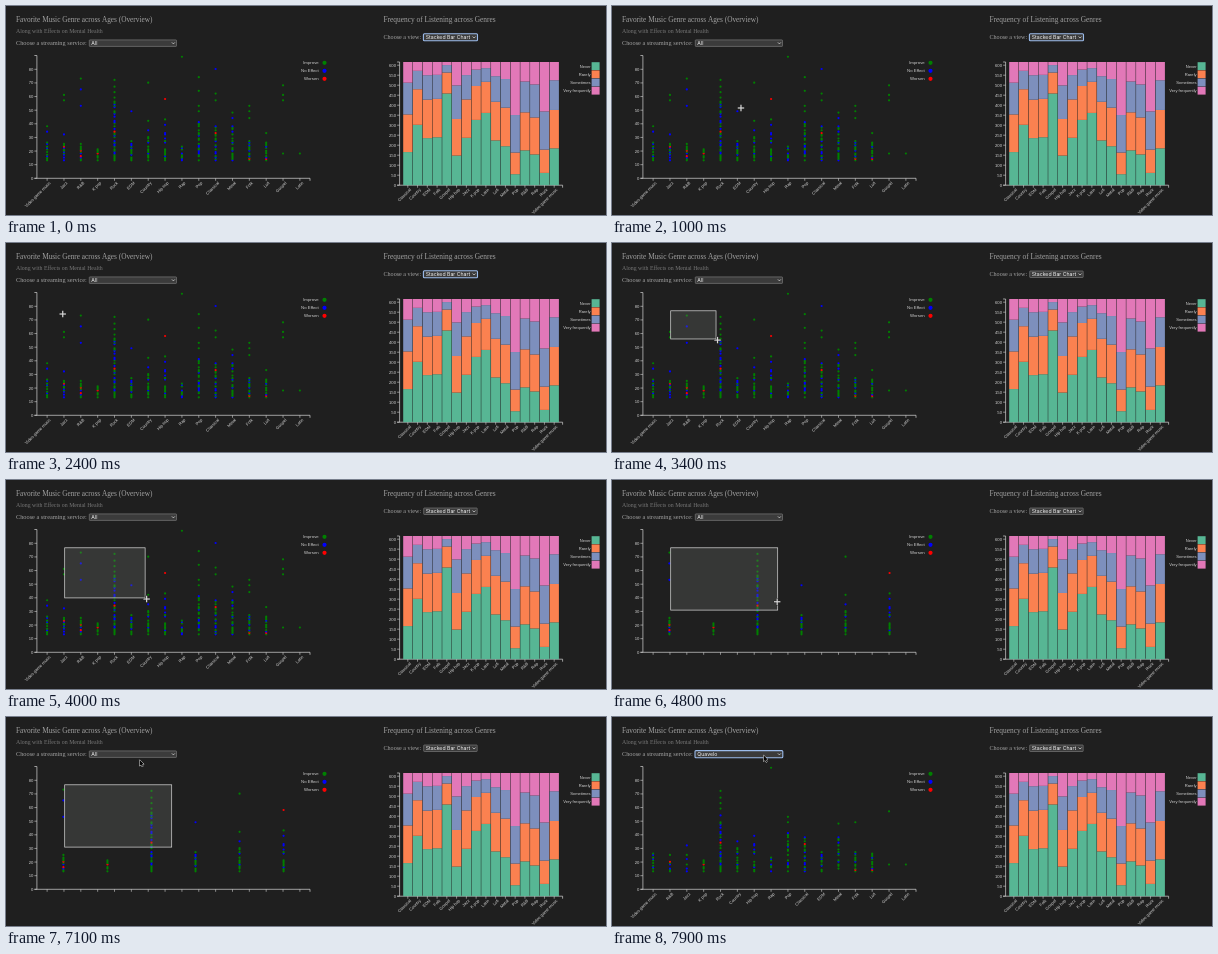
Write an HTML page with a canvas that moves like this. It is 600 px wide and 209 px high and loops after 8000 ms.

```html
<!DOCTYPE html>
<html lang="en">
<head>
<meta charset="utf-8">
<title>Music charts</title>
<style>
html, body { margin: 0; width: 100%; height: 100%; overflow: hidden; background: #1f1f1f; }
canvas { display: block; width: 600px; height: 209px; }
</style>
</head>
<body>
<canvas id="stage"></canvas>
<script>
const W = 600, H = 209, LOOP = 8000;
const canvas = document.getElementById('stage');
const ctx = canvas.getContext('2d');
const ratio = window.devicePixelRatio || 1;
canvas.width = W * ratio;
canvas.height = H * ratio;

const SERIF = '"Liberation Serif", serif';
const SANS = '"Liberation Sans", sans-serif';
const UI = 'Inter, sans-serif';
const AXIS = '#d4d4d4';
const GREEN = '#008000', BLUE = '#0000ff', RED = '#ff0000';
const BANDS = ['#57b694', '#fb8150', '#7d8fbd', '#e278b8'];

// name, log-odds of never listening, upper age of the crowd, lone ages on and off the service
const GENRES = [
  ['Video game music', -.85, 27, [], [38, 34]],
  ['Jazz', -.47, 25, [32], [61, 57]],
  ['R&B', -.93, 25, [], [73, 65, 53]],
  ['K pop', .12, 21, [], []],
  ['Rock', -2.2, 59, [72, 67, 63], []],
  ['EDM', -.48, 29, [], [49]],
  ['Country', -.04, 30, [35], [70, 42]],
  ['Hip hop', -1.15, 33, [39], [58, 43]],
  ['Rap', -1.1, 24, [89], []],
  ['Pop', -2.32, 41, [53, 49], [74, 64]],
  ['Classical', -1, 38, [], [80, 62, 57]],
  ['Metal', -.77, 39, [48], [44]],
  ['Folk', -.45, 29, [49], [53, 44]],
  ['Lofi', -.56, 26, [], [33]],
  ['Gospel', 1.07, 0, [57, 18], [68, 61]],
  ['Latin', .35, 0, [18], []]
];
const ALL = GENRES.map(g => g[0]);
const ZOOMED = ALL.slice(2, 8);
const FILTERED = ('Video game music,R&B,Jazz,K pop,Rock,Country,Hip hop,Rap,' +
  'Pop,Classical,EDM,Metal,Folk,Lofi,Gospel,Latin').split(',');
const SERVICES = ['All', 'Quavelo', 'ClipBarn Music', 'I do not use a streaming service.',
  'Quince Music', 'Other streaming service', 'Melvana'];

let seed = 11;
function random() {
  seed = (seed * 16807) % 2147483647;
  return seed / 2147483647;
}

const dots = [];
for (const [name, , crowd, on, off] of GENRES) {
  const add = (age, kept) => {
    const r = random();
    dots.push({ name, age, kept, color: r < .7 ? GREEN : r < .96 ? BLUE : RED });
  };
  for (let age = 13; age <= crowd; age++) {
    if (random() < .95 - .3 * age / crowd) add(age, random() < .8);
  }
  on.forEach(age => add(age, true));
  off.forEach(age => add(age, false));
}

function text(str, x, y, size, family, color, align = 'left') {
  ctx.font = size + 'px ' + family;
  ctx.fillStyle = color;
  ctx.textAlign = align;
  ctx.fillText(str, x, y);
}

function slanted(str, x, y) {
  ctx.save();
  ctx.translate(x, y);
  ctx.rotate(-Math.PI / 4);
  text(str, 0, 0, 4.2, SANS, AXIS, 'right');
  ctx.restore();
}

function path(points, color, width) {
  ctx.beginPath();
  points.forEach(([x, y]) => ctx.lineTo(x, y));
  ctx.strokeStyle = color;
  ctx.lineWidth = width;
  ctx.stroke();
}

function disc(x, y, r, color) {
  ctx.beginPath();
  ctx.arc(x, y, r, 0, 7);
  ctx.fillStyle = color;
  ctx.fill();
}

function box(x, y, w, h, r, fill, stroke, width) {
  ctx.beginPath();
  ctx.roundRect(x, y, w, h, r);
  ctx.fillStyle = fill;
  ctx.fill();
  if (!stroke) return;
  ctx.strokeStyle = stroke;
  ctx.lineWidth = width;
  ctx.stroke();
}

function select(label, x, y, w, focused) {
  if (focused) box(x - .3, y - .3, w + .6, 7.1, 1, '#3b3b3b', '#9cbcec', 1.1);
  else box(x, y, w, 6.5, .6, '#3b3b3b', '#858585', .6);
  text(label, x + 2, y + 5.1, 5.2, UI, '#f4f4f4');
  path([[x + w - 4.6, y + 2.5], [x + w - 3.1, y + 4], [x + w - 1.6, y + 2.5]], '#e8e8e8', .7);
}

// both axes of a chart, with values up the side
function axes(left, right, top, base, step, count, unit) {
  path([[left - 2.5, top], [left, top], [left, base], [left - 2.5, base]], AXIS, .7);
  path([[left, base], [right, base], [right, base + 2.5]], AXIS, .7);
  for (let i = 0; i <= count; i++) {
    const y = base - i * step * unit;
    path([[left - 2.5, y], [left, y]], AXIS, .6);
    text(i * step, left - 3.6, y + 1.5, 4.2, SANS, AXIS, 'right');
  }
}

// point scale over the scatter axis
function columns(names) {
  const step = 273 / (names.length + .2);
  return Object.fromEntries(names.map((n, i) => [n, 31 + step * (i + .6)]));
}

function scatter(names, filtered, labels) {
  const unit = 1.3625;
  axes(30.9, 304, 49.5, 172.3, 10, 8, unit);
  for (const [name, x] of Object.entries(columns(labels ? names : ALL))) {
    path([[x, 172.3], [x, 174.8]], AXIS, .6);
    if (labels) slanted(name, x + 3.8, 177.3);
  }
  const at = columns(names);
  for (const d of dots) {
    if (!(d.name in at) || (filtered && !d.kept)) continue;
    disc(at[d.name], 172 - d.age * unit, 1.1, d.color);
  }
  [['Improve', GREEN], ['No Effect', BLUE], ['Worsen', RED]].forEach(([label, color], i) => {
    const y = 56.8 + i * 8;
    text(label, 312.7, y + 1.4, 4.3, SANS, AXIS, 'right');
    disc(318.5, y, 2.1, color);
  });
}

// cumulative shares follow a logistic curve, one equal step per answer
function stacked() {
  const base = 179.2, full = 123.2;
  axes(393.6, 556.6, 56, base, 50, 12, .2);
  [...GENRES].sort((a, b) => a[0] < b[0] ? -1 : 1).forEach(([name, odds], i) => {
    const x = 397.2 + i * 9.76;
    let low = 0;
    BANDS.forEach((color, k) => {
      const high = k < 3 ? 1 / (1 + Math.exp(-odds - 1.3 * k)) : 1;
      ctx.fillStyle = color;
      ctx.fillRect(x, base - high * full, 9.3, (high - low) * full);
      low = high;
    });
    path([[x + 4.6, base], [x + 4.6, base + 2.5]], AXIS, .6);
    slanted(name, x + 8.2, 184);
  });
  ['Never', 'Rarely', 'Sometimes', 'Very frequently'].forEach((label, i) => {
    const y = 56.2 + i * 8.2;
    ctx.fillStyle = BANDS[i];
    ctx.fillRect(585.6, y, 8, 7.8);
    text(label, 584.6, y + 5.5, 4.1, SANS, AXIS, 'right');
  });
}

function menu(active) {
  ctx.save();
  ctx.shadowColor = 'rgba(0,0,0,.5)';
  ctx.shadowBlur = 4 * ratio;
  box(79.3, 32.3, 96.6, 64.6, 2.6, '#2a2b2a');
  ctx.restore();
  box(79.3, 32.3, 96.6, 64.6, 2.6, '#2a2b2a', '#484848', .5);
  box(81.3, 33.4 + active * 9, 92.6, 8.6, 1.6, '#1a60bd');
  SERVICES.forEach((label, i) => text(label, 89.9, 39.6 + i * 9, 5.25, UI, '#f6f6f6'));
  path([[84, 37.8], [85.3, 39.5], [87.5, 35.8]], '#f6f6f6', .8);
}

function cross(x, y) {
  for (const [color, w, r] of [['#222', 2.2, 3.6], ['#d8d8d8', 1.2, 3.2]]) {
    path([[x - r, y], [x + r, y]], color, w);
    path([[x, y - r], [x, y + r]], color, w);
  }
}

function arrow(x, y) {
  ctx.beginPath();
  [[0, 0], [0, 6], [1.4, 4.8], [2.4, 6.9], [3.4, 6.4], [2.5, 4.4], [4.3, 4.3]]
    .forEach(([dx, dy]) => ctx.lineTo(x + dx, y + dy));
  ctx.closePath();
  ctx.fillStyle = '#050505';
  ctx.strokeStyle = '#f4f4f4';
  ctx.lineWidth = .9;
  ctx.stroke();
  ctx.fill();
}

const APPEAR = 800, PRESS = 2650, DRAGGED = 4500, RELEASE = 4700;
const OPEN = 5600, HOVER = 6700, CLOSE = 7050, PICK = 7200;

// time, x, y of the pointer
const ROUTE = [
  [APPEAR, 150, 114], [1000, 129, 102], [2300, 56, 72], [PRESS, 59, 68], [4000, 140.6, 119],
  [DRAGGED, 167.2, 131.2], [RELEASE, 167.2, 131.2], [5400, 147, 37], [6200, 147, 37],
  [6900, 133, 43], [CLOSE, 133, 43], [LOOP, 153, 38]
];
function pointer(t) {
  const i = ROUTE.findIndex(p => p[0] > t);
  const [t0, x0, y0] = ROUTE[i - 1], [t1, x1, y1] = ROUTE[i];
  const k = (t - t0) / (t1 - t0);
  const e = k * (1 + 3 * k - 2 * k * k) / 2;
  return [x0 + (x1 - x0) * e, y0 + (y1 - y0) * e];
}

function brush(t) {
  const [x, y] = pointer(Math.min(t, DRAGGED));
  const rect = [58.7, 67.8, Math.max(0, x - 60.2), Math.max(0, y - 68.9)];
  ctx.fillStyle = 'rgba(115,120,115,.28)';
  ctx.fillRect(...rect);
  ctx.strokeStyle = '#d8d8d8';
  ctx.lineWidth = .7;
  ctx.strokeRect(...rect);
}

function draw(t) {
  ctx.setTransform(ratio, 0, 0, ratio, 0, 0);
  ctx.fillStyle = '#1f1f1f';
  ctx.fillRect(0, 0, W, H);

  text('Favorite Music Genre across Ages (Overview)', 10, 16, 7.3, SERIF, '#a2a2a2');
  text('Along with Effects on Mental Health', 10, 27, 5.85, SERIF, '#777');
  text('Choose a streaming service:', 10, 39, 6.3, SERIF, '#a2a2a2');
  text('Frequency of Listening across Genres', 377.5, 16, 7.4, SERIF, '#a2a2a2');
  text('Choose a view:', 377.5, 33.4, 6.1, SERIF, '#a2a2a2');

  const picked = t >= PICK;
  select(SERVICES[picked ? 1 : 0], 83.3, 33.9, 87.2, picked);
  select('Stacked Bar Chart', 417.7, 28, 53.5, t < PRESS);
  stacked();

  if (picked) scatter(FILTERED, true, true);
  else if (t >= RELEASE) scatter(ZOOMED, false, false);
  else scatter(ALL, false, true);

  if (t >= PRESS && !picked) brush(t);
  if (t >= OPEN && t < CLOSE) menu(t < HOVER ? 0 : 1);
  if (t >= APPEAR) {
    const [x, y] = pointer(t);
    if (y > 49) cross(x, y);
    else arrow(x, y);
  }
}

const start = performance.now();
function tick() {
  draw((performance.now() - start) % LOOP);
  requestAnimationFrame(tick);
}
tick();
</script>
</body>
</html>
```
